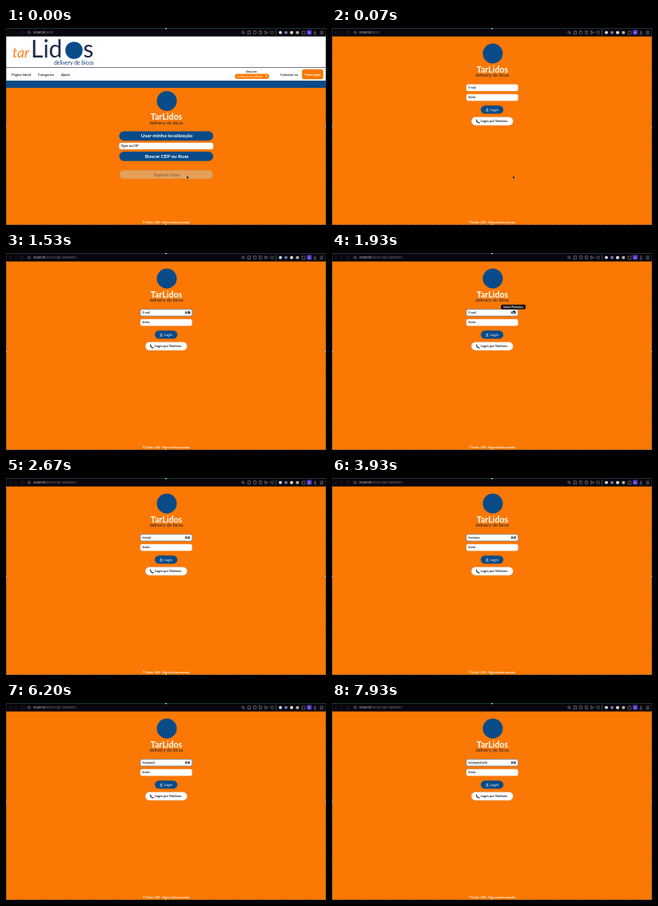
These frames come from a looping animation (400x247 px, 8 s). An HTML page:

```html
<!DOCTYPE html>
<html lang="pt-BR">
<head>
<meta charset="utf-8">
<title>Login</title>
<style>
  html, body { margin: 0; width: 100%; height: 100%; overflow: hidden; background: #fa7803; }
  svg { display: block; width: 100%; height: 100%; }
  text { font-family: Lato, "Open Sans", sans-serif; white-space: pre; }
  .bold { font-weight: 700; }
  .mid { text-anchor: middle; }
  .url { font-family: Inter, Roboto, sans-serif; font-size: 3.7px; }
  .line { fill: none; stroke: #9b98a2; stroke-width: .55; stroke-linecap: round; stroke-linejoin: round; }
  .blue { fill: #084b88; }
  .navy { fill: #1b2238; }
  .white { fill: #fff; }
  .small { font-size: 3.3px; font-weight: 700; fill: #222; }
  .field { fill: #fff; stroke: #d8dce2; stroke-width: .4; }
  .focus { stroke: #4a86c6; stroke-width: .6; }
</style>
</head>
<body>
<svg viewBox="0 0 400 247" preserveAspectRatio="none">
  <defs>
    <g id="brand">
      <circle cx="201" cy="32" r="12.5" class="blue"/>
      <text x="200.5" y="55.6" class="white bold mid" font-size="10.6">TarLidos</text>
      <text x="200.5" y="61.2" class="navy mid" font-size="5.75">delivery de bicos</text>
    </g>
  </defs>
  <rect width="400" height="247" fill="#fa7803"/>

  <g id="home">
    <rect y="10" width="400" height="56" fill="#fff"/>
    <rect y="49" width="400" height="1" fill="#777a80"/>
    <rect y="66" width="400" height="9" class="blue"/>
    <text x="8" y="37" font-size="17.5" font-style="italic" fill="#f5831f">tar</text>
    <g font-size="30" fill="#1d2c48">
      <text x="31" y="37.3">Lid</text>
      <text x="96.5" y="37.3">s</text>
    </g>
    <circle cx="85" cy="28" r="10.8" class="blue"/>
    <text x="60" y="46" font-size="6.8" fill="#123f70">delivery de bicos</text>
    <g class="bold" font-size="4.2" fill="#22252b">
      <text x="7" y="59.7">Página Inicial</text>
      <text x="40" y="59.7">Categorias</text>
      <text x="69" y="59.7">Ajuda</text>
      <text x="343" y="59.7">Cadastre-se</text>
      <text x="307" y="56.3" class="mid" font-size="3.2">Estou em:</text>
    </g>
    <rect x="286" y="57.5" width="43" height="6.2" rx="3.1" fill="#fa7803"/>
    <text x="288.5" y="61.6" class="white" font-size="3">Localização não definida</text>
    <circle cx="325.5" cy="60.2" r="1" fill="none" stroke="#fff" stroke-width=".6"/>
    <rect x="370" y="51.7" width="26.6" height="12.6" rx="3" fill="#fa7803"/>
    <text x="383.3" y="59.5" class="white bold mid" font-size="4.1">Fazer login</text>
    <use href="#brand" y="59.5"/>
    <rect x="141.5" y="129.5" width="117.5" height="11.8" rx="5.9" class="blue"/>
    <text x="201" y="137.4" class="white bold mid" font-size="6.4">Usar minha localização</text>
    <rect x="141.5" y="144" width="117.5" height="8" rx="2.5" class="field"/>
    <text x="144" y="149.2" class="small">Digite seu CEP</text>
    <rect x="141.5" y="155" width="117.5" height="11.8" rx="5.9" class="blue"/>
    <text x="201" y="162.9" class="white bold mid" font-size="6.2">Buscar CEP ou Ruas</text>
    <rect x="141.8" y="178.3" width="117" height="10.8" rx="5.4" fill="#e6a059" stroke="#c98a50" stroke-width=".5"/>
    <text x="201" y="185.6" class="bold mid" font-size="5" fill="#8f6a48">Explorar mapa</text>
  </g>

  <g id="login">
    <use href="#brand"/>
    <rect id="mail" x="168" y="70.7" width="64.5" height="8.2" rx="2" class="field"/>
    <text id="typed" x="170.5" y="75.9" class="small"></text>
    <rect id="caret" y="73" width=".4" height="3.6" fill="#222"/>
    <g id="keys" fill="#4b515b">
      <rect x="223.8" y="73.3" width="2.8" height="3" rx=".6"/>
      <rect x="227.2" y="73.3" width="2.8" height="3" rx=".6"/>
      <path d="M224.5 74.8h1.4M227.9 74.8h1.4" stroke="#fff" stroke-width=".5"/>
    </g>
    <rect x="168" y="83" width="64.5" height="8.2" rx="2" class="field"/>
    <text x="170.5" y="88.2" class="small">Senha</text>
    <rect x="186" y="97.2" width="28.2" height="10.4" rx="5.2" class="blue"/>
    <path d="M194 100.6v2.4m-1.1-1l1.1 1.1 1.1-1.1M192.4 104.2h3.2" class="line" style="stroke:#fff"/>
    <text x="197.5" y="103.8" class="white" font-size="4.5">Login</text>
    <rect x="174.3" y="111.8" width="52" height="10.2" rx="5.1" fill="#fff" stroke="#ccd0d6" stroke-width=".4"/>
    <path d="M180.7 115q-.4 3.2 3.6 4" fill="none" stroke="#1b1d22" stroke-width="1.1" stroke-linecap="round"/>
    <text x="186" y="118.2" class="bold" font-size="4.1" fill="#1b1d22">Login por Telefone</text>
    <g id="tip">
      <rect x="211.3" y="64.8" width="30.6" height="5.8" rx="1.4" fill="#0c0b0d"/>
      <text x="226.6" y="68.7" class="white bold mid" font-size="2.9">Unlock 9Fechadura</text>
    </g>
  </g>

  <text x="200.3" y="244.5" class="white bold mid" font-size="2.7">© TarLidos - 2025 – Todos os direitos reservados.</text>

  <g id="bar">
    <rect width="400" height="10.6" fill="#09060d"/>
    <rect width="400" height=".7" fill="#17383d"/>
    <path d="M6 4l-2 2 2 2M11.5 4l2 2-2 2M22 4.5a2 2 0 1 0 .3 2" class="line" style="stroke:#3a3642"/>
    <circle cx="28.7" cy="5.7" r="1.6" class="line"/>
    <text x="34" y="7.1" class="url" fill="#c9c6ce">localhost<tspan id="path" fill="#77727f"></tspan></text>
    <g class="line">
      <circle cx="296" cy="5.3" r="1.4"/><path d="M297.1 6.4l1.2 1.3"/>
      <path d="M302.6 3.8h2.8v4.2l-1.4-1.1-1.4 1.1z"/>
      <rect x="309.4" y="3.8" width="3.4" height="3.6" rx=".8"/>
      <rect x="316.6" y="3.8" width="3" height="3.8" rx=".6"/>
      <path d="M323.5 4l4 1.6-4 1.8.6-1.8z"/>
      <path d="M332.5 7.8l-2-2.1q-.5-1.700 1-1.7l1 .9 1-.9q1.5 0 1 1.7z"/>
      <path d="M337.5 2.5v6.5" style="stroke:#2c8d8f"/>
      <path d="M370.5 4.2h1.4q.5-1.3 1 0h1v3.8h-3.4z"/>
      <path d="M386.3 3.5v3m-1.2-1.1l1.200 1.2 1.2-1.2M384.7 8h3.2"/>
      <path d="M392.7 4.100h3.600M392.7 5.800h3.600M392.7 7.500h3.600"/>
    </g>
    <circle cx="343" cy="5.7" r="1.9" fill="#dfe3e6"/>
    <circle cx="350" cy="5.7" r="1.9" fill="#6b80bd"/>
    <circle cx="357" cy="5.7" r="2" fill="#e6e3da"/>
    <circle cx="364.3" cy="5.7" r="2" fill="#b9b3a6"/>
    <rect x="376" y="2.6" width="6" height="6" rx="1" fill="#5b35c9"/>
    <text x="379" y="7.1" class="white bold mid" font-size="4">t</text>
  </g>
  <rect x=".2" y=".2" width="399.6" height="246.6" fill="none" stroke="#24494c" stroke-width=".8" stroke-dasharray="2 1"/>
  <g fill="#bfe3e2" stroke="#39575a" stroke-width=".3">
    <circle cx="200" cy=".4" r="1.1"/><circle cx="200" cy="246.6" r="1.1"/>
    <circle cx=".4" cy="123.5" r="1.1"/><circle cx="399.6" cy="123.5" r="1.1"/>
  </g>

  <path id="arrow" d="M0 0v4.2l1-.9.7 1.5.8-.4-.7-1.4h1.3z" fill="#111" stroke="#fff" stroke-width=".2"/>
  <path id="hand" d="M0 0q.6-.4.8.3v1.200l1.500.4q.6.3.3 1.100l-.4 1h-1.700l-1.400-1.600q.2-.6.900 0z" fill="#111" stroke="#fff" stroke-width=".2"/>
</svg>
<script>
const LOOP = 8000;
const el = id => document.getElementById(id);
const show = (id, on) => { el(id).style.display = on ? "" : "none"; };

// time, x, y of the pointer; each place holds until the next
const moves = [
  [0, 226, 185], [270, 214, 176], [330, 199, 163], [530, 203, 124],
  [670, 208, 105], [730, 208, 92], [800, 206, 82], [870, 204, 74], [930, 203.5, 69.5],
  [1070, 207, 70.5], [1130, 214, 72], [1200, 221, 73], [1270, 226, 73.5], [1330, 229, 73.5],
  [1470, 228, 72], [1600, 226.5, 70.8]
];

// time, content of the mail field; "|" marks a visible caret
const typing = [
  [0, ""], [2200, "h|"], [2330, "he|"], [2470, "hen|"], [2530, "henr|"], [2600, "henri|"],
  [2670, "henriq|"], [2870, "henriqu|"], [3200, "henrique|"], [3400, "henriques|"],
  [3930, "henriques"], [4000, "henriques|"], [4130, "henrique|"], [4400, "henrique"],
  [4870, "henrique|"], [5330, "henrique"], [5400, "henrique|"], [5670, "henrique@|"],
  [6200, "henrique@"], [6670, "henrique@|"], [6730, "henrique@t|"], [7000, "henrique@ta|"],
  [7270, "henrique@tar|"], [7400, "henrique@tarl|"], [7670, "henrique@tarli|"],
  [7800, "henrique@tarlid|"], [7930, "henrique@tarlid"]
];

const at = (steps, t) => steps.findLast(s => s[0] <= t);

function draw(t) {
  const home = t < 70;
  show("home", home);
  show("login", !home);
  el("path").textContent = t < 270 ? ":8081" : ":8081/login-password";

  const [, x, y] = at(moves, t);
  const hover = t >= 1600;
  show("arrow", !hover);
  show("hand", hover && t < 2200);
  el(hover ? "hand" : "arrow").setAttribute("transform", `translate(${x} ${y})`);
  show("tip", t >= 1730 && t < 2130);
  show("keys", t >= 1470);
  el("mail").classList.toggle("focus", t >= 1470);

  const value = at(typing, t)[1];
  const typed = el("typed");
  typed.textContent = value.replace("|", "") || "E-mail";
  const caret = value.endsWith("|");
  show("caret", caret);
  if (caret) el("caret").setAttribute("x", 170.7 + typed.getComputedTextLength());
}

const start = performance.now();
function tick() {
  draw((performance.now() - start) % LOOP);
  requestAnimationFrame(tick);
}
tick();
</script>
</body>
</html>
```
